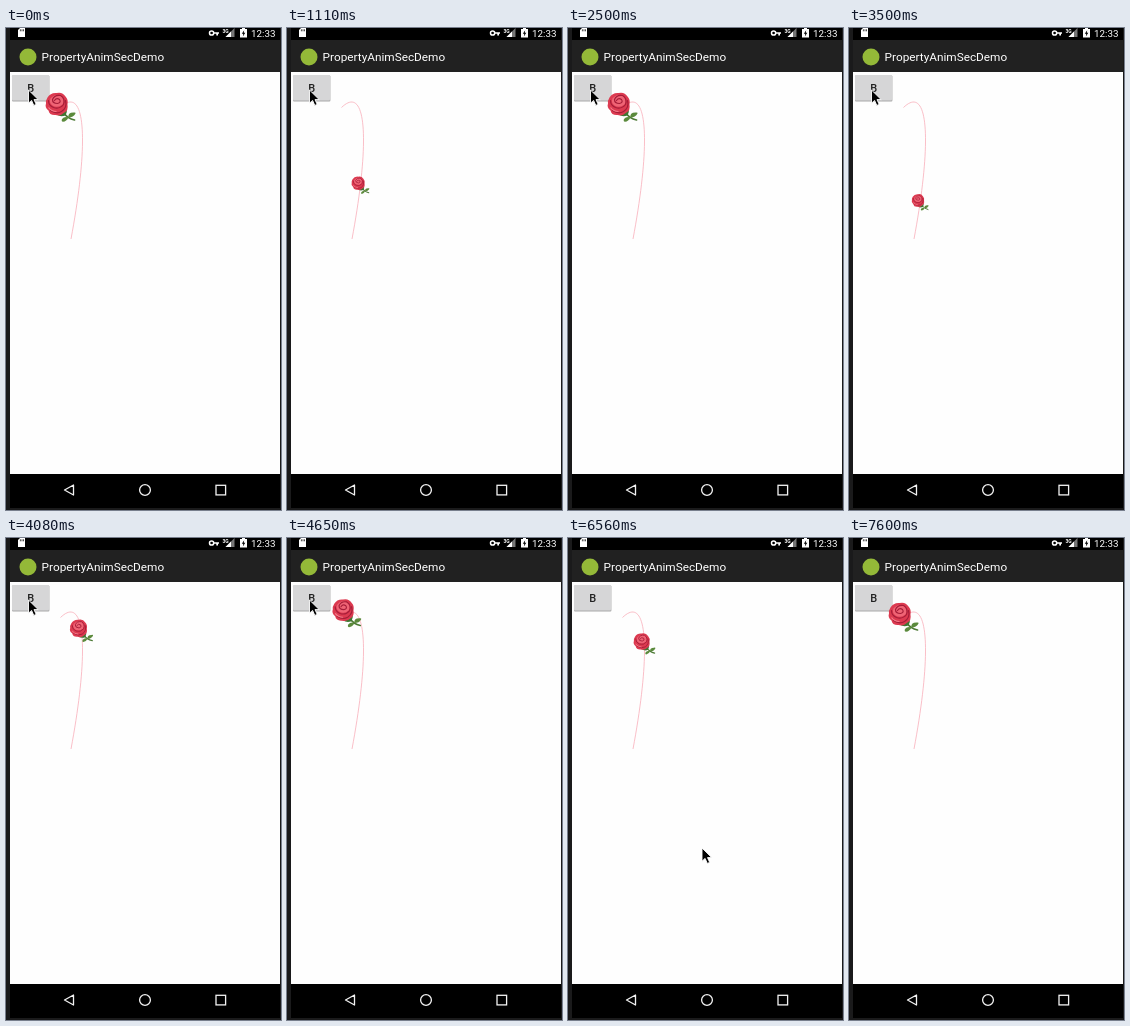
Write an HTML page that moves like this. It is 275x482 px and loops after 8500 ms.

```html
<!DOCTYPE html>
<html lang="en">
<head>
<meta charset="utf-8">
<title>PropertyAnimSecDemo</title>
<style>
html, body { margin: 0; width: 100%; height: 100%; overflow: hidden; background: #1c1c1c; }
svg { display: block; width: 100%; height: 100%; }
text { font-family: Roboto, sans-serif; fill: #fff; }
</style>
</head>
<body>
<svg viewBox="0 0 275 482">
  <!-- screen, bars -->
  <rect width="275" height="482" fill="#1a1a1b"/>
  <rect x="4" width="270" height="480" fill="#000"/>
  <rect x="4" y="12" width="270" height="32" fill="#212121"/>
  <rect x="4" y="44" width="270" height="402" fill="#fefefe"/>

  <!-- status bar -->
  <g fill="#fff">
    <path d="M14 0H19V9H12V2Z"/>
    <path d="M14.4 1.3v2M16 1.3v2M17.5 1.3v2" stroke="#000" stroke-width=".7"/>
    <circle cx="205.6" cy="5" r="2.1" fill="none" stroke="#fff" stroke-width="1.5"/>
    <path d="M208 4.2H213V5.8H212V7.6H210.3V5.8H208Z"/>
    <path d="M228.5 0V9H219.5Z" fill="#777"/>
    <path d="M225 3.6V9H219.5Z"/>
    <text x="216.5" y="4.6" font-size="5" font-weight="700">3G</text>
    <path d="M236 0H239V1H241V9.5H234V1H236Z"/>
    <path d="M238.2 2.2L235.8 5.8H237.3L236.9 8.5L239.3 4.8H237.8Z" fill="#000"/>
  </g>
  <text x="245" y="8.6" font-size="9.8">12:33</text>

  <!-- action bar -->
  <circle cx="22" cy="29" r="8.5" fill="#94b938"/>
  <text x="35.6" y="33" font-size="11.8">PropertyAnimSecDemo</text>

  <!-- navigation bar -->
  <g fill="none" stroke="#f2f2f2" stroke-width="1.3">
    <path d="M67.5 457V467L58.5 462Z" stroke-linejoin="round"/>
    <circle cx="139" cy="462" r="5.4"/>
    <rect x="210" y="457.3" width="9.6" height="9.6"/>
  </g>

  <!-- button -->
  <rect x="6" y="47.6" width="37.4" height="26" rx="1" fill="#aaa"/>
  <rect x="6" y="47" width="37" height="25.5" rx="1" fill="#d6d6d7"/>
  <text x="24.8" y="64" font-size="11" font-weight="500" text-anchor="middle" style="fill:#222">B</text>

  <path id="track" fill="none" stroke="#f9aab6" stroke-width=".75"/>

  <g id="rose">
    <g fill="none" stroke="#4d7a36" stroke-linecap="round">
      <path d="M3 5Q7 11 14 12.5" stroke-width="1.7"/>
    </g>
    <path d="M8 10Q7 5 13 5Q15.5 4.5 15 6Q13 10 8 10Z" fill="#5b8a3c"/>
    <path d="M8 10Q4 8.5 1.5 11.5Q.5 14 2.5 14.3Q6 14 8 10Z" fill="#5b8a3c"/>
    <path d="M-4 7Q0 10 5 8Q7 4 6 0Z" fill="#3f7433"/>
    <path d="M-13-10Q-10-15-4-14.5Q2-16 5-11Q8-8 7-3Q8 3 4 5Q0 9-5 7.5Q-11 8-12 3Q-16 0-14.5-4Q-15-7-13-10Z" fill="#dc3a50"/>
    <path d="M-10-9Q-6-14 0-12Q5-8 2-3Q-3 1-8-2Q-12-5-10-9Z" fill="#ef6475"/>
    <g fill="none" stroke="#a51d38" stroke-width="1.2" stroke-linecap="round">
      <path d="M-6-7Q-4-10-1-8Q1-5-3-4Q-8-4-8-8Q-6-13 0-12Q5-9 3-3Q-1 2-7 0Q-12-2-12-7"/>
      <path d="M5-7Q7 0 1 4Q-4 7-10 3"/>
    </g>
    <path d="M-12 0Q-9 4-4 4" fill="none" stroke="#f47d8b" stroke-width="1.2"/>
  </g>

  <circle id="ripple" cx="23.5" cy="62" r="7" fill="#f4f4fa" fill-opacity=".65" stroke="#a9afd6"/>
  <path id="cursor" d="M0 0V13.2L3.1 10.4L5.3 15.4L7.7 14.4L5.5 9.6H9.7Z" fill="#000" stroke="#fff" stroke-width=".9"/>
</svg>
<script>
const LOOP = 8500, STEPS = 34;
const runs = [[530, 2500], [3040, 5000], [5650, 7600]];
const curve = [[65, 211], [83.5, 112], [79.5, 55.5], [54.5, 79.5]];
const [track, rose, ripple, cursor] = ['track', 'rose', 'ripple', 'cursor'].map(id => document.getElementById(id));
const [a, b, c, d] = curve;
track.setAttribute('d', `M${a} C${b} ${c} ${d}`);

const clamp = v => Math.max(0, Math.min(1, v));
const lerp = (p, q, k) => p + (q - p) * k;
const place = (el, x, y, k = 1) => el.setAttribute('transform', `translate(${x} ${y}) scale(${k})`);

function bezier(s, axis) {
  const r = 1 - s;
  return r ** 3 * a[axis] + 3 * r * r * s * b[axis] + 3 * r * s * s * c[axis] + s ** 3 * d[axis];
}

function cursorAt(t) {
  if (t < 6500) {
    const k = clamp((t - 6080) / 420) ** 1.5;
    return [lerp(22.5, 134, k), lerp(62, 310, k)];
  }
  const k = clamp((t - 6590) / 420);
  return [lerp(134, 280, k), lerp(310, 490, k)];
}

function draw(t) {
  let step = STEPS, shown = t;
  for (const [start, end] of runs) {
    if (t < start || t >= end) continue;
    const gap = (end - start) / STEPS;
    step = Math.floor((t - start) / gap + 0.2);
    shown = start + step * gap;
  }
  // accelerate, then decelerate
  const s = (1 - Math.cos(Math.PI * step / STEPS)) / 2;
  place(rose, bezier(s, 0), bezier(s, 1), 0.5 + s / 2);
  ripple.style.display = step < 3 ? '' : 'none';
  ripple.setAttribute('r', 7 - step);
  place(cursor, ...cursorAt(shown));
}

const origin = performance.now();
function frame() {
  draw((performance.now() - origin) % LOOP);
  requestAnimationFrame(frame);
}
frame();
</script>
</body>
</html>
```
